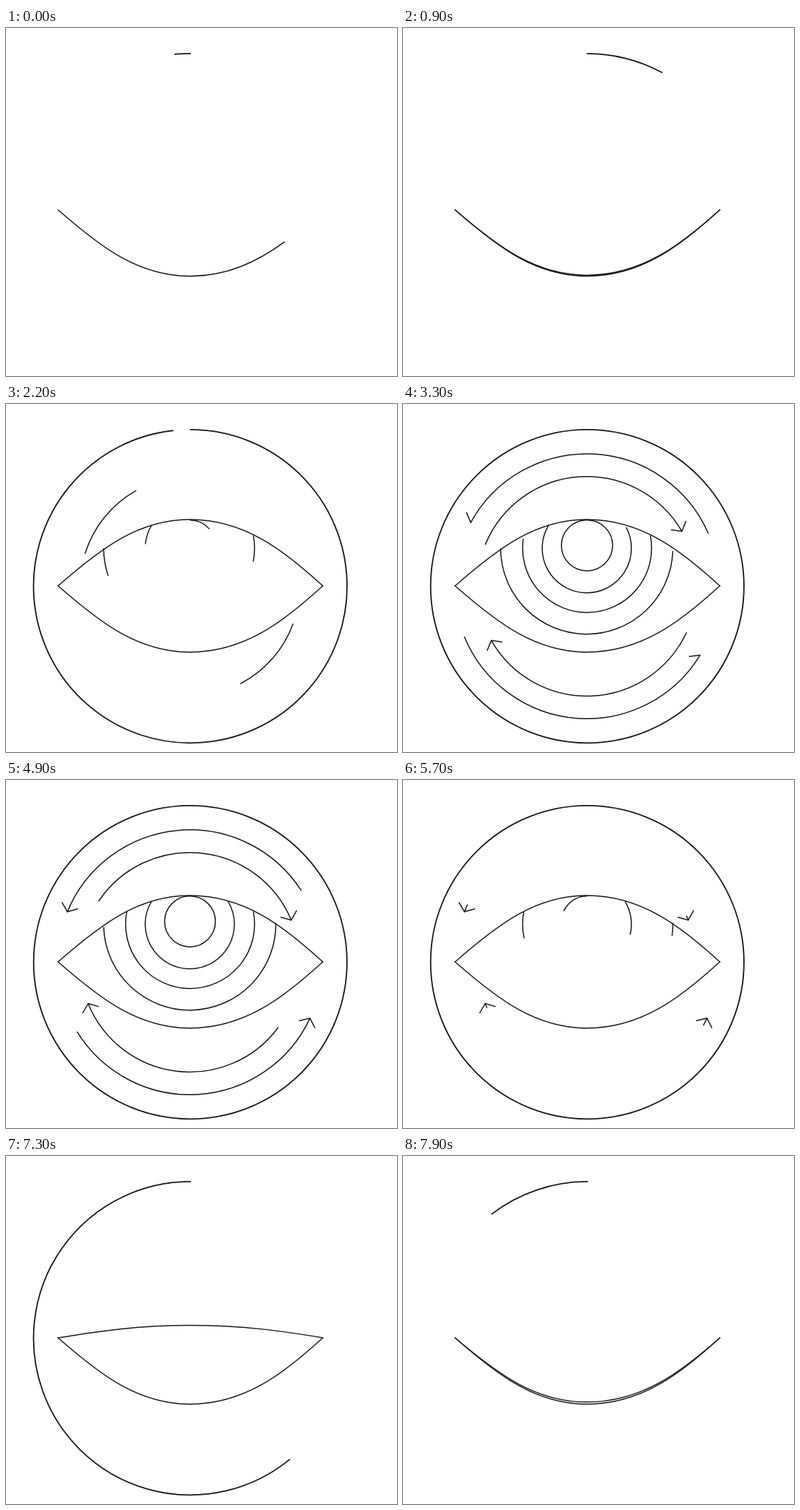
Animation of 548x488 px, one loop 8 s. Source, as an HTML page:

```html
<!DOCTYPE html>
<html lang="en">
<head>
<meta charset="utf-8">
<title>Line eye</title>
<style>
  html, body { margin: 0; width: 100%; height: 100%; overflow: hidden; background: #fff; }
  svg { display: block; width: 548px; height: 488px; }
  path { fill: none; stroke: #161616; stroke-width: 1.5; stroke-linecap: round; stroke-linejoin: round; }
  .ring { stroke-width: 1.8; }
</style>
</head>
<body>
<svg id="stage" viewBox="0 0 548 488"></svg>
<script>
const LOOP = 8000, STEP = 100;
const TAIL = 8115, TAIL_END = 420; // closing moves that run on past the loop point
const CX = 258.3, CY = 255.6;
const ARROW_CX = 257.7, BARB = 15, BARB_ANGLE = 52;
const stage = document.getElementById('stage');

function addPath(cls) {
  const p = document.createElementNS('http://www.w3.org/2000/svg', 'path');
  if (cls) p.setAttribute('class', cls);
  stage.appendChild(p);
  return p;
}

// Easing
const clamp = x => Math.min(1, Math.max(0, x));
const sine = x => (1 - Math.cos(Math.PI * x)) / 2;
const linear = x => x;
function glide(x) { // cubic-bezier(.33, 0, .1, 1)
  let lo = 0, hi = 1;
  for (let i = 0; i < 30; i++) {
    const s = (lo + hi) / 2, q = 1 - s;
    if (0.99 * s * q * q + 0.3 * s * s * q + s * s * s < x) lo = s; else hi = s;
  }
  return lo * lo * (3 - 2 * lo);
}
const phase = (t, start, length, ease) => ease(clamp((t - start) / length));
const mix = (a, b, k) => a + (b - a) * k;

// Angles are in degrees, clockwise from the top.
function polar(cx, cy, r, deg) {
  const a = deg * Math.PI / 180;
  return [cx + r * Math.sin(a), cy - r * Math.cos(a)];
}
const pt = p => p.map(v => v.toFixed(2)).join(' ');

function arc(cx, cy, r, from, to) {
  if (Math.abs(to - from) < 0.05) return '';
  const sweep = to > from ? 1 : 0;
  const end = a => `A${r} ${r} 0 0 ${sweep} ${pt(polar(cx, cy, r, a))}`;
  return `M${pt(polar(cx, cy, r, from))}${end((from + to) / 2)}${end(to)}`;
}

// Show only the part of a path between fractions a and b.
function trim(p, a, b) {
  p.style.display = b - a > 0.002 ? '' : 'none';
  p.setAttribute('pathLength', 1);
  p.setAttribute('stroke-dasharray', a <= 0 && b >= 1 ? 'none' : `${b - a} 2`);
  p.setAttribute('stroke-dashoffset', -a);
}

// Circular strokes: drawn from the start, later erased from the start.
const rounds = [
  { cx: CX, cy: CY, r: 219.7, from: 0, to: 360, draw: [652, 1918], erase: [6585, 1663], cls: 'ring' },
  { cx: 257.5, cy: 202, r: 120.7, from: -90.5, to: -270.5, draw: [1970, 1617], erase: [4836, 1000] },
  { cx: 258, cy: 202, r: 90.4, from: 79.2, to: 280.8, draw: [1960, 1617], erase: [4920, 1000] },
  { cx: 257.6, cy: 202.3, r: 62.5, from: -59.3, to: -300.7, draw: [1970, 1600], erase: [4980, 1000] },
  { cx: 257.9, cy: 198.3, r: 35.6, from: 0, to: 360, draw: [1960, 1500], erase: [4980, 1000] }
];
for (const c of rounds) c.path = addPath(c.cls);

// side tells which barb of the arrowhead is drawn first.
const inner = { r: 153.9, turn: 12.4, draw: [1900, 1300], barb: [2950, 200], erase: [4785, 1000] };
const outer = { r: 185.7, turn: 10.6, draw: [2220, 1080], barb: [3200, 200], erase: [4803, 1000] };
const arrows = [
  { ...inner, tail: -60.1, head: 67.4, side: 1 },
  { ...inner, tail: 122.5, head: 247.9, side: 1 },
  { ...outer, tail: 60, head: -67.6, side: -1 },
  { ...outer, tail: -118.9, head: -245, side: 1 }
];
for (const a of arrows) { a.path = addPath(); a.tip = addPath(); }

const lower = addPath(), upper = addPath();

function lid(open) {
  const y = v => mix(v, 510 - v, open).toFixed(2);
  return `M73 255C135 ${y(309.5)} 187 ${y(348)} 258 ${y(348)}C335 ${y(348)} 391 ${y(303.5)} 444 255`;
}

function drawRound(c, t) {
  const a = phase(t, ...c.erase, sine), b = phase(t, ...c.draw, glide);
  c.path.setAttribute('d', arc(c.cx, c.cy, c.r, mix(c.from, c.to, a), mix(c.from, c.to, b)));
}

function drawArrow(a, t) {
  const dir = Math.sign(a.head - a.tail);
  const shift = -dir * a.turn * (1 - phase(t, 2300, 2300, sine));
  const at = k => mix(a.tail, a.head, k) + shift;
  const front = at(phase(t, ...a.draw, glide));
  a.path.setAttribute('d', arc(ARROW_CX, CY, a.r, at(phase(t, ...a.erase, sine)), front));

  const tip = polar(ARROW_CX, CY, a.r, front);
  const back = front - dir * 90;
  const barb = side => polar(...tip, BARB, back + side * BARB_ANGLE);
  a.tip.setAttribute('d', `M${pt(barb(a.side))}L${pt(tip)}L${pt(barb(-a.side))}`);
  trim(a.tip, phase(t, 5750, 200, linear), phase(t, ...a.barb, linear));
}

function drawLids(t) {
  const open = phase(t, 850, 1095, glide) - phase(t, 6750, 1250, sine);
  const drawn = phase(t, TAIL_END, 480, sine), gone = phase(t, 7965, 563, sine);
  lower.setAttribute('d', lid(0));
  upper.setAttribute('d', open > 0 ? lid(open) : ''); // a shut lid is a single line
  for (const p of [lower, upper]) trim(p, 1 - drawn, 1 - gone);
}

function render(now) {
  let t = Math.floor((now % LOOP) / STEP) * STEP;
  if (t < TAIL_END) t += TAIL;
  for (const c of rounds) drawRound(c, t);
  for (const a of arrows) drawArrow(a, t);
  drawLids(t);
}

const begin = performance.now();
function tick() {
  render(performance.now() - begin);
  requestAnimationFrame(tick);
}
tick();
</script>
</body>
</html>
```
